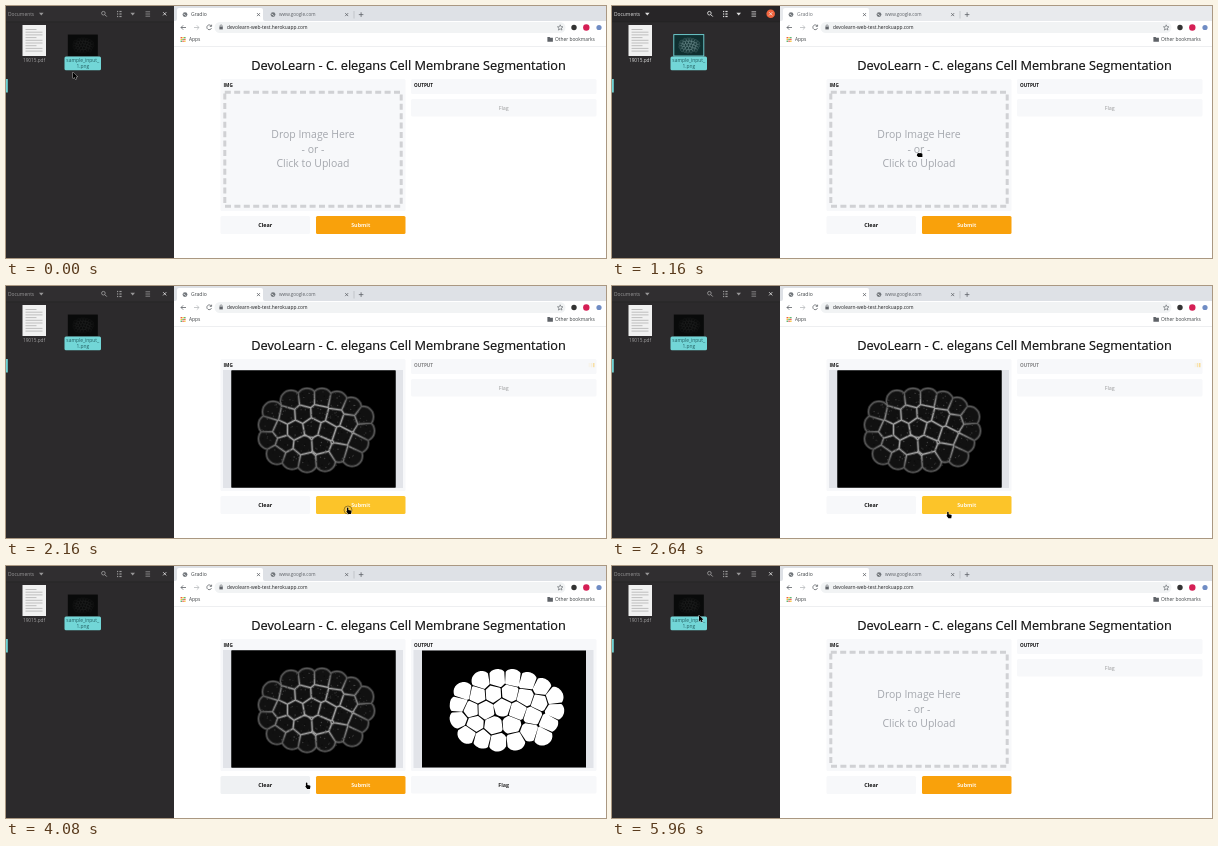
An HTML page that plays this animation: 600x252 px, repeating every 6000 ms.

```html
<!DOCTYPE html>
<html lang="en">
<head>
<meta charset="utf-8">
<title>Cell membrane segmentation demo</title>
<style>
  html, body { margin: 0; width: 100%; height: 100%; overflow: hidden; background: #fff; }
  svg { display: block; width: 100vw; height: 100vh; }
  text { font-family: "Open Sans", "Noto Sans", sans-serif; white-space: pre; }
</style>
</head>
<body>
<svg id="stage" viewBox="0 0 600 252"></svg>
<script>
const LOOP = 6000;
const stage = document.getElementById('stage');

// Markup helpers
const rect = (x, y, w, h, fill, more = '') =>
  `<rect x="${x}" y="${y}" width="${w}" height="${h}" fill="${fill}" ${more}/>`;
const text = (x, y, size, fill, str, more = '') =>
  `<text x="${x}" y="${y}" font-size="${size}" fill="${fill}" ${more}>${str}</text>`;
const line = (d, color, width = 0.8, more = '') =>
  `<path d="${d}" fill="none" stroke="${color}" stroke-width="${width}" ${more}/>`;
const dot = (x, y, r, fill, more = '') =>
  `<circle cx="${x}" cy="${y}" r="${r}" fill="${fill}" ${more}/>`;
const cross = (x, y, r, color) =>
  line(`M${x - r} ${y - r}l${2 * r} ${2 * r}m0 ${-2 * r}l${-2 * r} ${2 * r}`, color);
const middle = 'text-anchor="middle"';
const bold = 'font-weight="700"';
const centredBold = `${middle} ${bold}`;

let seed = 7;
const random = () => (seed = (seed * 16807) % 2147483647) / 2147483647;

// Cell centres relative to the middle of the embryo
const centres = [
  [-25, -29], [-9, -31], [6, -31], [21, -28], [35, -22],
  [-43, -18], [-29, -15], [-13, -16], [3, -17], [19, -13], [33, -8], [47, -13],
  [-47, -5], [-36, 0], [-21, 0], [-4, -3], [11, 1], [26, 6], [48, 1],
  [-47, 9], [-32, 14], [-13, 16], [5, 15], [42, 13],
  [-39, 24], [-24, 29], [-9, 32], [9, 31], [23, 22], [36, 26]
];
const CELL_REACH = 10.5;
const disc = ([x, y]) => Array.from({ length: 28 }, (_, i) => {
  const a = i * Math.PI / 14;
  return [x + CELL_REACH * Math.cos(a), y + CELL_REACH * Math.sin(a)];
});

// Keeps the part of a polygon that is nearer to p than to q
function nearer(poly, p, q) {
  const side = ([x, y]) => (x - (p[0] + q[0]) / 2) * (q[0] - p[0]) + (y - (p[1] + q[1]) / 2) * (q[1] - p[1]);
  const out = [];
  poly.forEach((a, i) => {
    const b = poly[(i + 1) % poly.length];
    const sa = side(a), sb = side(b);
    if (sa <= 0) out.push(a);
    if (sa * sb < 0) {
      const k = sa / (sa - sb);
      out.push([a[0] + (b[0] - a[0]) * k, a[1] + (b[1] - a[1]) * k]);
    }
  });
  return out;
}
const cells = centres.map(p => centres.reduce((poly, q) => (q === p ? poly : nearer(poly, p, q)), disc(p)));
const pathOf = poly => 'M' + poly.map(p => p.map(v => v.toFixed(1)).join(' ')).join('L') + 'Z';
const shrink = (poly, by) => {
  const c = [0, 1].map(k => poly.reduce((s, p) => s + p[k], 0) / poly.length);
  return poly.map(p => {
    const k = Math.max(0, 1 - by / Math.hypot(p[0] - c[0], p[1] - c[1]));
    return [c[0] + (p[0] - c[0]) * k, c[1] + (p[1] - c[1]) * k];
  });
};
const membranes = cells.map(pathOf).join('');
const masks = cells.map(c => pathOf(shrink(c, 2))).join('');
const grain = Array.from({ length: 520 }, () => {
  const a = random() * 2 * Math.PI, r = Math.sqrt(random());
  const shade = random() < 0.5 ? '#000' : '#777';
  return dot((55 * r * Math.cos(a)).toFixed(1), (39 * r * Math.sin(a)).toFixed(1), 0.7, shade,
    `opacity="${(random() * 0.45).toFixed(2)}"`);
}).join('');

const glow = (id, inner, outer) =>
  `<radialGradient id="${id}" gradientUnits="userSpaceOnUse" cx="0" cy="0" r="54" gradientTransform="scale(1 .74)">
    <stop offset=".6" stop-color="${inner}"/><stop offset="1" stop-color="${outer}"/></radialGradient>`;
const defs = `<defs>
  <filter id="soft" x="-10%" y="-10%" width="120%" height="120%"><feGaussianBlur stdDeviation=".5"/></filter>
  ${glow('membrane', '#a2a2a2', '#585858')}${glow('halo', '#444', '#2c2c2c')}
  <g id="embryo">${rect(-84.5, -59.3, 164, 117, '#000')}
    <g filter="url(#soft)">
      <path d="${membranes}" fill="#111"/>
      ${line(membranes, 'url(#halo)', 2.8)}${line(membranes, 'url(#membrane)', 1.1)}${grain}
    </g></g>
</defs>`;

function fileWindow() {
  const pageLines = Array.from({ length: 9 }, (_, i) =>
    line(`M19.5 ${23.5 + i * 2.7}h${i % 3 ? 17 : 11}`, '#aaa', 0.7)).join('');
  return rect(0, 0, 168, 252, '#2c2a2c') + rect(0, 0, 168, 16, '#302e30', 'id="fileBar"') +
    rect(0, 15.6, 168, 0.6, '#222') +
    rect(0, 73, 1.8, 13.5, '#70d3d5') +
    `<g id="fileTools">` + text(2, 9.6, 4.9, '#ddd', 'Documents') +
    `<path d="M33 6.8h4.6l-2.3 2.6zM124.4 6.8h4.6l-2.3 2.6z" fill="#ddd"/>` +
    `<circle cx="97.4" cy="7.2" r="1.8" fill="none" stroke="#ddd" stroke-width=".9"/>` + line('M98.8 8.6l2 2', '#ddd', 1) +
    [5.5, 8, 10.5].map(y => rect(111, y - 0.6, 1.2, 1.2, '#ddd') + rect(113.4, y - 0.6, 2.2, 1.2, '#ddd')).join('') +
    line('M139.5 5.8h4.6m-4.6 2.2h4.6m-4.6 2.2h4.6', '#ddd') + '</g>' +
    dot(158.7, 7.8, 4.3, '#f0653f', 'id="closeDisc"') + cross(158.7, 7.8, 1.6, '#eee') +
    rect(16.5, 19, 23.5, 31, '#f1f1f1') + pageLines +
    text(28, 56.4, 4.7, '#ddd', '19015.pdf', `${middle} id="documentLabel"`) +
    rect(58.5, 50.5, 36.5, 13.8, '#72d6d7', 'rx="1.5"') +
    text(76.8, 56, 4.9, '#245f62', 'sample_input_', middle) +
    text(76.8, 61.8, 4.9, '#245f62', '1.png', middle) +
    rect(61.8, 28.6, 30, 21.4, '#0b0c0c') +
    `<g id="thumb"><use href="#embryo" transform="translate(77.3 39.4) scale(.18)"/></g>` +
    rect(61.8, 28.6, 30, 21.4, '#37a8ad', 'id="tint" fill-opacity=".28" stroke="#74d8da" stroke-width=".9"');
}

function globe(x, y) {
  return dot(x, y, 2.4, '#70757a') + line(`M${x - 1.6} ${y - 0.6}l1.5 .6 1 1.2`, '#fff', 0.7);
}

function browser() {
  const appColors = ['#e8453c', '#f6b518', '#3aa757'];
  const apps = [0, 1, 2].flatMap(i => [0, 1, 2].map(j =>
    rect(174.6 + i * 1.8, 31 + j * 1.8, 1.3, 1.3, appColors[(i + j) % 3]))).join('');
  return rect(168, 0, 432, 252, '#fff') + rect(168, 0, 432, 15, '#dee1e6', 'id="tabStrip"') +
    '<path d="M169 15q2 0 2-2V4q0-2 2-2h82q2 0 2 2v9q0 2 2 2z" fill="#fff"/>' +
    globe(179, 8.6) + text(185, 10.4, 5, '#3c4043', 'Gradio', 'id="tabTitle"') + cross(252.5, 8.6, 1.5, '#5f6368') +
    globe(267, 8.6) + text(273, 10.4, 4.6, '#5f6368', 'www.google.com') + cross(340.7, 8.6, 1.5, '#5f6368') +
    line('M348 5v7.5', '#a5a8ad', 0.5) + line('M352.8 8.6h4.6m-2.3-2.3v4.6', '#5f6368') +
    line('M180 21.5h-5m2.2-2.2l-2.2 2.2 2.2 2.2', '#5f6368') +
    line('M188 21.5h5m-2.2-2.2l2.2 2.2-2.2 2.2', '#b9bbbe') +
    line('M205.3 20a2.4 2.4 0 1 0 .2 2.2M205.6 18.7v1.7h-1.8', '#5f6368') +
    rect(208.5, 16, 351, 11, '#f1f3f4', 'rx="5.5"') +
    rect(213.4, 20.6, 3.4, 2.8, '#5f6368') + line('M214.1 20.8v-1a1 1 0 0 1 2 0v1', '#5f6368', 0.6) +
    text(221, 23.2, 4.85, '#202124', 'devolearn-web-test.herokuapp.com') +
    line('M554.2 18.8l.8 1.9 2 .1-1.6 1.3.6 2-1.8-1.1-1.8 1.1.6-2-1.6-1.3 2-.1z', '#5f6368', 0.6) +
    dot(568, 21.5, 2.7, '#333') + dot(580.3, 21.5, 3.2, '#d51f55') + dot(593, 21.5, 2.6, '#6f8cc4') +
    apps + text(183, 35.4, 4.85, '#3c4043', 'Apps') +
    '<path d="M541.4 31h2.2l.7.8h2.6v4h-5.5z" fill="#5f6368"/>' +
    text(549, 35.4, 4.85, '#3c4043', 'Other bookmarks') + rect(168, 40, 432, 0.6, '#e3e5e8');
}

function viewer(x, content) {
  return rect(x, 84, 180, 118, '#e2e4e9') + rect(x + 8.5, 84.5, 164, 117, '#000') +
    `<g transform="translate(${x + 93} 143.8)">${content}</g>`;
}

function page() {
  return text(402.5, 64, 12.74, '#111', 'DevoLearn - C. elegans Cell Membrane Segmentation', `${middle} stroke="#111" stroke-width=".2"`) +
    rect(214.5, 73, 185, 132, '#f7f8fa', 'rx="1.5"') +
    text(217.5, 80.6, 4.65, '#111', 'IMG', bold) +
    `<g id="dropZone">` + rect(218.8, 86.2, 176.4, 114, 'none', 'stroke="#d0d1d4" stroke-width="3" stroke-dasharray="6 3.4"') +
    ['Drop Image Here', '- or -', 'Click to Upload'].map((s, i) =>
      text(307, 132 + i * 14.6, 10.48, '#a4a7ad', s, middle)).join('') + '</g>' +
    `<g id="input">${viewer(217, '<use href="#embryo"/>')}</g>` +
    rect(214.5, 210, 89.5, 18, '#f7f8fa', 'rx="1.5" id="clear"') + text(259.2, 221, 5.4, '#111', 'Clear', centredBold) +
    rect(310, 210, 89.5, 18, '#f9a10b', 'rx="1.5" id="submit"') + text(354.7, 221, 5.35, '#fff', 'Submit', `${centredBold} opacity=".9"`) +
    `<g id="output">` + rect(405, 73, 185.5, 132, '#f7f8fa', 'rx="1.5"') +
    viewer(407.5, `<path d="${masks}" fill="#fff" stroke="#fff" stroke-width="2.4" stroke-linejoin="round"/>`) + '</g>' +
    rect(405, 73, 185.5, 15, '#f7f8fa', 'rx="1.5" id="emptyOutput"') +
    text(408, 80.6, 4.65, '#111', 'OUTPUT', `${bold} id="outputLabel"`) +
    `<g id="spinner">${[0, 1, 2].map(i => rect(582.6 + i * 2.2, 77, 1.5, 4.2, '#f9d98c')).join('')}</g>` +
    `<g id="flag">` + rect(405, 93, 185.5, 17.5, '#f7f8fa', 'rx="1.5"') +
    text(497.7, 103.6, 5.4, '#111', 'Flag', `${centredBold} id="flagLabel"`) + '</g>';
}

function pointers() {
  const edge = 'stroke="#fff" stroke-width=".6" paint-order="stroke" stroke-linejoin="round"';
  return dot(0, 0, 2.4, '#62b8ee', 'id="trail" stroke="#b5dcf5" stroke-width=".6"') +
    `<circle id="ring" cx="342" cy="224" r="4" fill="none" stroke="#5c4a20" stroke-width=".6"/>` +
    `<g id="cursor"><path id="arrow" d="M0 0v6.4l1.5-1.3 1 2.2 1.1-.5-1-2.1h2z" fill="#000" ${edge}/>` +
    `<path id="hand" d="M.6 .4q.8 0 .8 .9v1.7l2.4.5q.7.2.6.9L4 7H1.2L-.7 4.4q.1-.7.6-.4V1.3q0-.9.7-.9z" fill="#000" ${edge}/>` +
    `<path id="fist" d="M.2 1.2q1-1.4 2-.7 1-.8 1.8 0 1.3-.4 1.4 1v2.7H1.2L-.2 2.6z" fill="#000" ${edge}/></g>`;
}

stage.innerHTML = defs + browser() + page() + fileWindow() + pointers();
const el = Object.fromEntries([...stage.querySelectorAll('[id]')].map(n => [n.id, n]));

// Pointer tip: time, x, y
const route = [
  [0, 67, 66], [40, 67, 66], [120, 80, 45], [240, 290, 140], [360, 355, 208], [640, 355, 208],
  [760, 78, 40], [800, 100, 62], [880, 243.5, 145], [1000, 305, 145], [1200, 305, 147],
  [1440, 334, 202], [1640, 348, 214], [1840, 341, 221], [2560, 341, 221], [2760, 325, 233],
  [2960, 300, 216], [4800, 300, 216], [5000, 286.5, 228.5], [5199, 286.5, 228.5], [5240, 284.7, 221.3],
  [5560, 284.7, 221.3], [5840, 79, 54], [5960, 87, 49], [6000, 87, 49]
];
const clamp = v => Math.min(1, Math.max(0, v));
function pointerAt(t) {
  const i = Math.max(1, route.findIndex(p => p[0] > t));
  const [a, b] = [route[i - 1], route[i]];
  const k = clamp((t - a[0]) / (b[0] - a[0]));
  const e = k * k * (3 - 2 * k);
  return [a[1] + (b[1] - a[1]) * e, a[2] + (b[2] - a[2]) * e];
}
const within = (t, from, to) => t >= from && t < to;
const show = (node, on) => node.setAttribute('display', on ? 'inline' : 'none');
const move = (node, [x, y]) => node.setAttribute('transform', `translate(${x.toFixed(2)} ${y.toFixed(2)})`);

function render(t) {
  const [x, y] = pointerAt(t);
  const focused = within(t, 720, 1260);
  const dragging = within(t, 780, 1200);
  const loaded = within(t, 1200, 5560);
  const waiting = within(t, 2120, 3920);
  const done = within(t, 3920, 5560);
  const overRow = y >= 210 && y <= 228;
  const overSubmit = overRow && x > 310 && x < 399;
  const overClear = overRow && x > 214 && x < 304;

  el.fileBar.setAttribute('fill', focused ? '#272527' : '#302e30');
  el.fileTools.setAttribute('opacity', focused ? 1 : 0.6);
  el.documentLabel.setAttribute('opacity', focused ? 1 : 0.65);
  el.thumb.setAttribute('opacity', focused ? 1 : 0.15);
  show(el.tint, focused);
  show(el.closeDisc, focused);
  el.tabStrip.setAttribute('fill', focused ? '#e8eaed' : '#dee1e6');
  el.tabTitle.setAttribute('fill', focused ? '#6b6f74' : '#3c4043');

  show(el.dropZone, !loaded);
  show(el.input, loaded);
  show(el.output, done);
  show(el.emptyOutput, !done);
  show(el.spinner, waiting);
  el.outputLabel.setAttribute('opacity', waiting ? 0.5 : 1);
  [...el.spinner.children].forEach((bar, i) =>
    bar.setAttribute('opacity', (0.5 + 0.4 * Math.sin(t / 90 - i * 1.4)).toFixed(2)));
  move(el.flag, [0, done ? 117 : 0]);
  el.flagLabel.setAttribute('opacity', done ? 0.4 + 0.6 * clamp((t - 3920) / 200) : 0.4);
  el.flagLabel.setAttribute('font-weight', done ? 700 : 500);
  el.submit.setAttribute('fill', overSubmit ? '#fcc429' : '#f9a10b');
  el.clear.setAttribute('fill', overClear && t < 4800 ? '#eff1f3' : '#f7f8fa');

  move(el.cursor, [x, y]);
  show(el.fist, dragging);
  show(el.hand, !dragging && (overSubmit || overClear));
  show(el.arrow, !dragging && !overSubmit && !overClear);
  show(el.trail, within(t, 820, 960));
  move(el.trail, pointerAt(t - 31).map((v, i) => v + (i ? 9 : 1)));
  show(el.ring, within(t, 2100, 2240));
}

const start = performance.now();
function tick() {
  render((performance.now() - start) % LOOP);
  requestAnimationFrame(tick);
}
tick();
</script>
</body>
</html>
```
